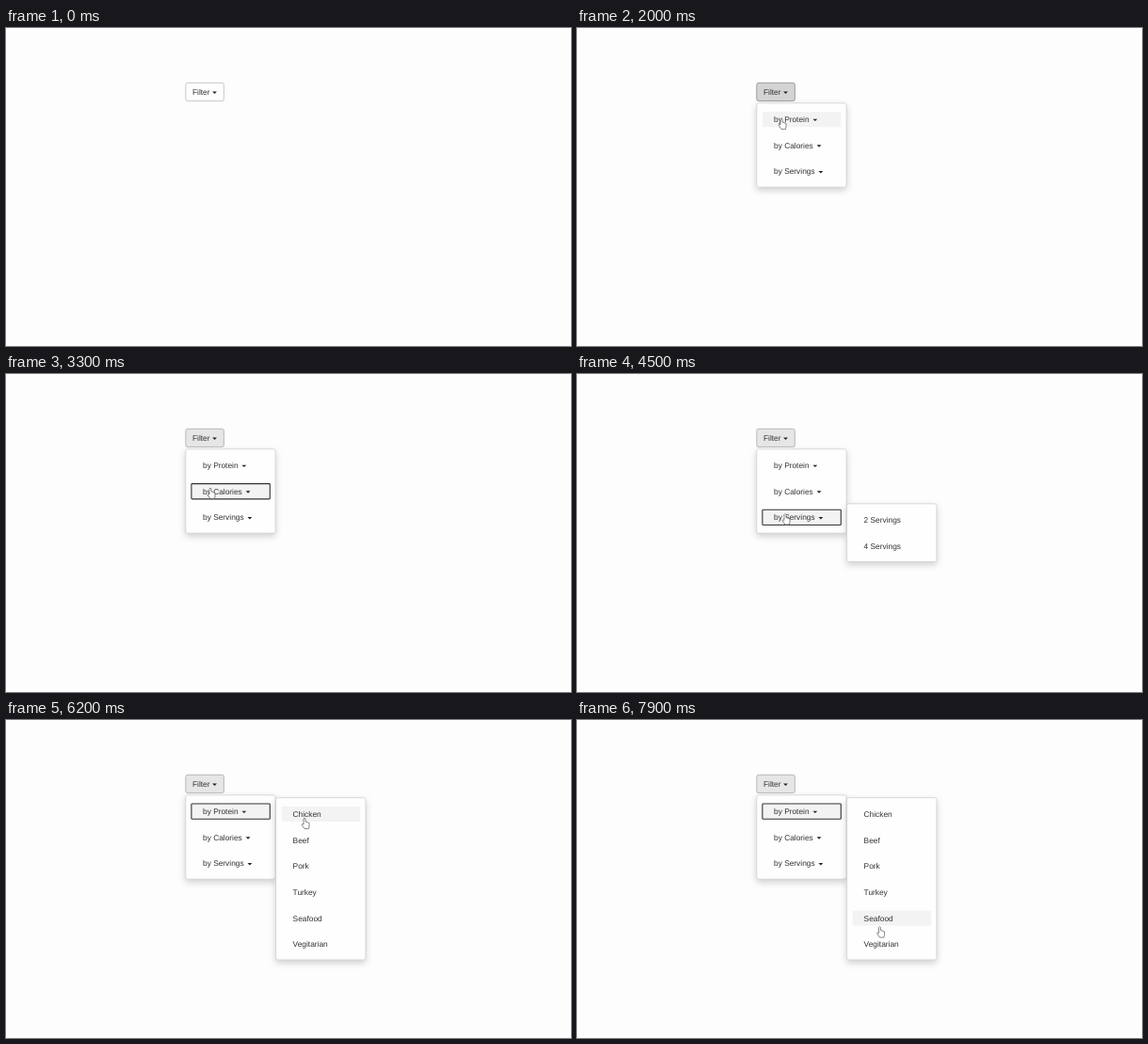
These frames come from a looping animation (600x338 px, 8000 ms). An HTML page:

```html
<!DOCTYPE html>
<html lang="en">
<head>
<meta charset="utf-8">
<title>Filter menu</title>
<style>
  html, body { margin: 0; width: 100%; height: 100%; overflow: hidden; background: #fdfdfe; }
  svg { display: block; width: 600px; height: 338px; }
  text { font: 8.36px "Liberation Sans", Arial, sans-serif; fill: #333; text-rendering: geometricPrecision; }
  .panel { fill: #fefefe; stroke: #ccc; stroke-width: .7; filter: drop-shadow(0 3.6px 3.6px rgba(0, 0, 0, .18)); }
  .caret { fill: #222; }
  .cursor { fill: #fff; stroke: #555; stroke-width: .7; stroke-linejoin: round; }
</style>
</head>
<body>
<svg id="stage" viewBox="0 0 600 338"></svg>
<script>
const LOOP = 8000, STEP = 100, PITCH = 27.65;
const ENTER = 100, OPEN = 1500;
const stage = document.getElementById('stage');

function add(parent, tag, attrs, text) {
  const node = document.createElementNS('http://www.w3.org/2000/svg', tag);
  set(node, attrs);
  if (text) node.textContent = text;
  return parent.appendChild(node);
}
function set(node, attrs) {
  for (const key in attrs) node.setAttribute(key, attrs[key]);
}
const show = (node, on) => set(node, { visibility: on ? 'visible' : 'hidden' });

function addLabel(parent, x, mid, text, gap) {
  const label = add(parent, 'text', { x, y: mid + 2.9 }, text);
  if (!gap) return;
  const end = x + label.getComputedTextLength() + gap;
  add(parent, 'path', { class: 'caret', d: `M${end} ${mid - .5}h4.8l-2.4 2.4z` });
}

function addMenu(x, top, labels, indent, gap) {
  const group = add(stage, 'g', {});
  add(group, 'rect', {
    class: 'panel', x, y: top, width: 95.3, height: labels.length * PITCH + 6.4, rx: 2.2
  });
  const rows = labels.map((label, i) => {
    const mid = top + 17.4 + i * PITCH;
    const back = add(group, 'rect', {
      x: x + 6.1, y: mid - 8.2, width: 83.4, height: 16.2, rx: .8, 'stroke-width': 1.1
    });
    addLabel(group, x + indent, mid, label, gap);
    return { back, mid };
  });
  return { group, x, rows, visible: false };
}

// Button and menus
const button = add(stage, 'rect', { x: 190.8, y: 58.3, width: 40.6, height: 19.3, rx: 2.2, 'stroke-width': .8 });
addLabel(stage, 198, 68.1, 'Filter', 2.6);

const main = addMenu(190.8, 79.8, ['by Protein', 'by Calories', 'by Servings'], 18.2, 3.9);
const subs = [
  ['Chicken', 'Beef', 'Pork', 'Turkey', 'Seafood', 'Vegitarian'],
  ['Under 300', '300 - 500', '500 - 700', 'Over 700'],
  ['2 Servings', '4 Servings']
].map((list, i) => addMenu(286.6, 82.6 + i * PITCH, list, 18));

// Cursors, both with the hot spot at the origin
const arrow = add(stage, 'path', { class: 'cursor', d: 'M0 0V8L2 6.3L3.3 9L4.5 8.4L3.3 5.8H5.8Z' });
const hand = add(stage, 'path', {
  class: 'cursor',
  d: 'M-1 7V1Q0-1 1 1V4L5 5.4V9L4.4 11.6H0L-3 7.2Q-2.6 5.6-1 7Z'
});

// The cursor rests between moves, each with a start, duration and end point
const moves = [
  { at: 100, lasts: 900, to: [217, 84] },
  { at: 1000, lasts: 300, to: [228, 69] },
  { at: 1700, lasts: 300, to: [217, 96] },
  { at: 2500, lasts: 700, to: [217, 121] },
  { at: 3400, lasts: 800, to: [221, 148.5] },
  { at: 4500, lasts: 700, to: [219, 98] },
  { at: 5400, lasts: 800, to: [317, 104] },
  { at: 6200, lasts: 1700, to: [321.5, 219.5] }
];
const cursorAt = t => moves.reduce((from, { at, lasts, to }) => {
  const k = Math.min(1, Math.max(0, (t - at) / lasts));
  return from.map((v, i) => v + (to[i] - v) * k);
}, [297, 297]);

// Pressing a row focuses it and closes the open submenu; releasing opens its own
const presses = [{ at: 2200, row: 0 }, { at: 3300, row: 1 }, { at: 4300, row: 2 }, { at: 5200, row: 0 }];

function drawRows(menu, x, y, focus) {
  let hit = false;
  menu.rows.forEach(({ back, mid }, i) => {
    const over = menu.visible && x > menu.x + 6 && x < menu.x + 90 && Math.abs(y - mid) < 9.3;
    const focused = i === focus;
    set(back, {
      fill: over || focused ? '#f3f3f3' : 'none',
      stroke: focused ? '#333' : 'none'
    });
    hit = hit || over;
  });
  return hit;
}

function draw(time) {
  const t = Math.floor(time % LOOP / STEP) * STEP;
  const [x, y] = cursorAt(t);
  const press = presses.filter(p => p.at <= t).pop();
  const focus = press ? press.row : -1;
  const overButton = x > 190 && x < 232 && y > 58 && y < 78;
  let pointing = overButton;

  main.visible = t >= OPEN;
  subs.forEach((sub, i) => { sub.visible = i === focus && t >= press.at + STEP; });
  for (const menu of [main, ...subs]) {
    show(menu.group, menu.visible);
    if (drawRows(menu, x, y, menu === main ? focus : -1)) pointing = true;
  }

  const [fill, stroke] = main.visible && !press ? ['#d4d4d4', '#8c8c8c']
    : main.visible || overButton ? ['#e6e6e6', '#adadad'] : ['#fefefe', '#bbb'];
  set(button, { fill, stroke });

  for (const node of [arrow, hand]) {
    set(node, { transform: `translate(${x} ${y})` });
    show(node, t >= ENTER && pointing === (node === hand));
  }
}

const start = performance.now();
function tick() {
  draw(performance.now() - start);
  requestAnimationFrame(tick);
}
tick();
</script>
</body>
</html>
```
